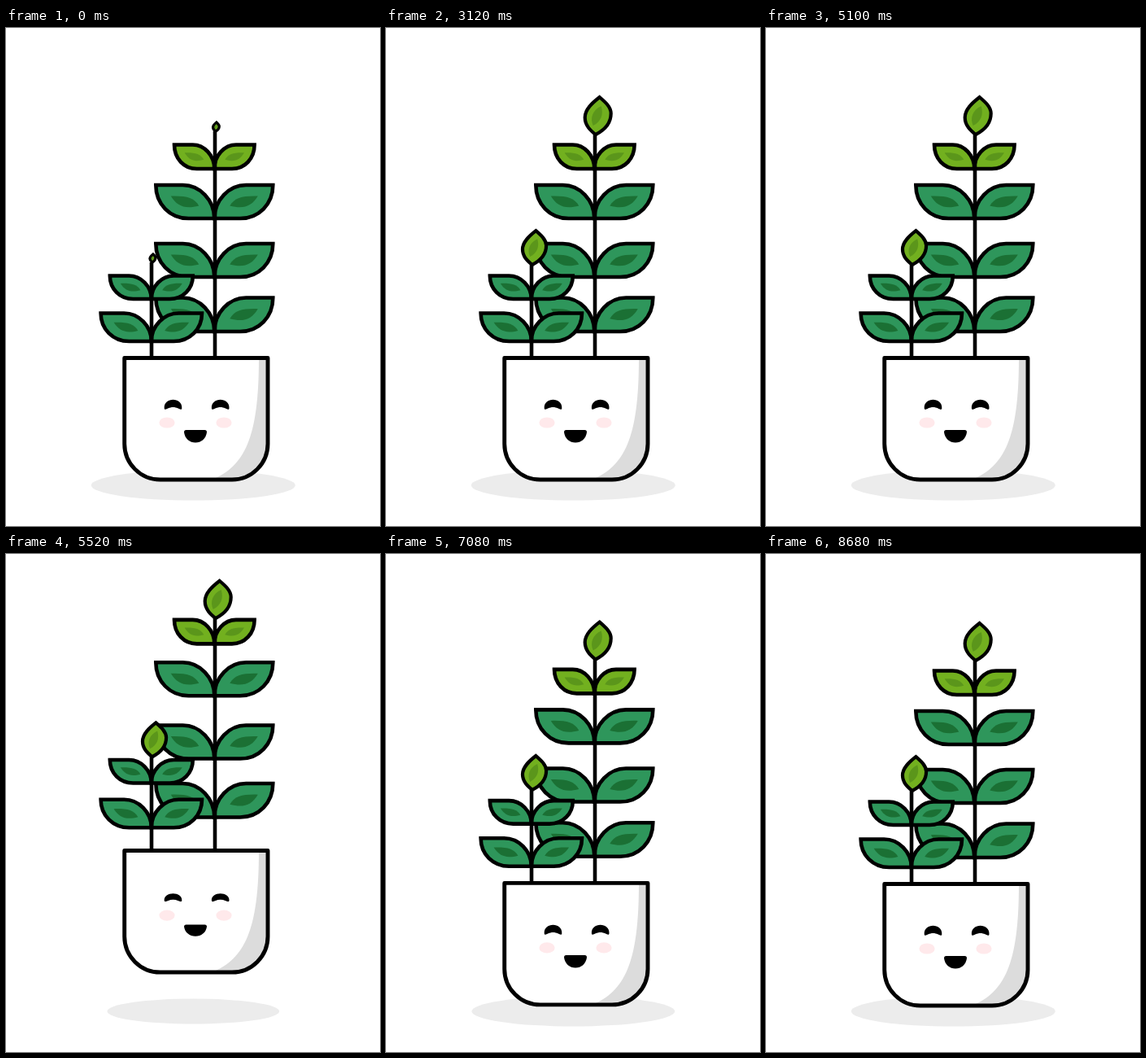
An HTML page with a canvas for the animation above (8.9 s loop, 460 px wide and 612 px high).

```html
<!DOCTYPE html>
<html lang="en">
<head>
<meta charset="utf-8">
<title>Happy plant</title>
<style>
  html, body { margin: 0; width: 100%; height: 100%; overflow: hidden; background: #fff; }
  canvas { display: block; width: 460px; height: 612px; }
</style>
</head>
<body>
<canvas id="stage"></canvas>
<script>
const W = 460, H = 612, LOOP = 8900;
const canvas = document.getElementById('stage');
const ctx = canvas.getContext('2d');
const dpr = window.devicePixelRatio || 1;
canvas.width = W * dpr;
canvas.height = H * dpr;

const GREEN = ['#2e965b', '#1b7034'];
const LIME = ['#72b01f', '#5b961b'];
const LINE = 4.6;

// Moments at which the motion pauses, then catches up.
const HOLDS = [[1640, 1860], [2300, 2460], [3960, 4140], [4140, 4380],
  [5520, 5760], [5800, 5980], [8360, 8500]];
const JUMPS = [3690, 5096, 6477, 7870];
const JUMP_HEIGHT = 42, FALL_AT = 390, JUMP_END = 792;

// Leaf pairs: top y, leaf width, leaf height, colours, lift per pixel of jump.
const TALL = { x: 257, leafX: 256.3, rows: [
  [331.5, 72, 41.5, GREEN, 1.21],
  [265, 72, 41, GREEN, 1.33],
  [193, 72, 41, GREEN, 1.46],
  [143.5, 49.3, 29.5, LIME, 1.53]
], bud: { x: 257.7, y: 131, size: 1, lift: 1.27, startY: 127 } };
const SMALL = { x: 179, leafX: 178.8, rows: [
  [350.5, 62.2, 34.5, GREEN, 1.19],
  [304.5, 51, 28.5, GREEN, 1.26]
], bud: { x: 179.8, y: 291, size: 0.91, lift: 1.02, startY: 288 } };

const shapes = {
  bud: new Path2D('M5 -46C-4 -39-13 -31-13 -21C-13 -11-6 -5 0 0C10 -5 19 -13 19 -26C19 -34 12 -40 5 -46Z'),
  budVein: new Path2D('M7 -35C10 -25 7 -16-3 -11C-7 -20-4 -30 7 -35Z'),
  vein: new Path2D('M19 25.5C25 15 35 13 53.5 13.5C46 26 36 30 19 25.5Z'),
  pot: new Path2D('M145.7 405.5H322V511A44 44 0 0 1 278 555H189.7A44 44 0 0 1 145.7 511Z'),
  shade: new Path2D('M311 406H322V511A44 44 0 0 1 278 555H254C293 538 311 505 311 406Z'),
  eye: new Path2D('M-10.8 4.5C-12 -9.8 12 -9.8 10.8 4.5C10 8 6 3 0 3C-6 3-10 8-10.8 4.5Z'),
  mouth: new Path2D('M-14 -5Q-14 -7.8-11.5 -7.8H11.5Q14 -7.8 14 -5C13 3 7 7.8 0 7.8C-7 7.8-13 3-14 -5Z')
};

const hill = ms => { const r = (Math.max(ms, 0) / 86) ** 4; return r / (1 + r); };

function clock(ms) {
  const t = Math.floor(ms / 20) * 20;
  const hold = HOLDS.find(([from, to]) => t >= from && t < to);
  return hold ? hold[0] : t;
}

function growth(t) {
  if (t <= 1320) return 0;
  if (t >= 3120) return 1;
  if (t <= 2300) {
    const u = (t - 1320) / 980;
    return 0.457 * u + 0.193 * u * u;
  }
  const rest = 1 - (t - 2300) / 820;
  return 1 - 0.35 * rest * rest;
}

function jump(t) {
  const start = JUMPS.find(s => t >= s && t < s + JUMP_END);
  if (start === undefined) return 0;
  const age = t - start;
  return JUMP_HEIGHT * hill(age) * (1 - hill(age - FALL_AT));
}

function at(x, y, sx, sy, draw) {
  ctx.save();
  ctx.translate(x, y);
  ctx.scale(sx, sy);
  draw();
  ctx.restore();
}

function ellipse(x, y, rx, ry, color) {
  ctx.fillStyle = color;
  ctx.beginPath();
  ctx.ellipse(x, y, rx, ry, 0, 0, Math.PI * 2);
  ctx.fill();
}

function fill(path, color) {
  ctx.fillStyle = color;
  ctx.fill(path);
}

function leaf(w, h, [color, dark]) {
  ctx.beginPath();
  ctx.moveTo(0, h);
  ctx.bezierCurveTo(0, 0.45 * h, 0.25 * w, 0, 0.54 * w, 0);
  ctx.lineTo(w, 0);
  ctx.bezierCurveTo(w, 0.57 * h, 0.76 * w, h, 0.44 * w, h);
  ctx.closePath();
  ctx.fillStyle = color;
  ctx.fill();
  ctx.lineWidth = LINE;
  ctx.stroke();
  at(0, 0, w / 72, h / 41, () => fill(shapes.vein, dark));
}

function bud({ x, y, size, lift, startY }, grown, height) {
  const baseY = startY + (y - startY) * Math.min(1, grown * 1.5) - lift * height;
  const s = size * (0.24 + 0.76 * grown);
  at(x, baseY, s, s, () => {
    fill(shapes.bud, LIME[0]);
    fill(shapes.budVein, LIME[1]);
    ctx.lineWidth = (3.3 + 0.9 * grown) / s;
    ctx.stroke(shapes.bud);
  });
}

function plant({ x, leafX, rows, bud: tip }, grown, height) {
  for (const [y, w, h, colors, lift] of rows) {
    for (const side of [-1, 1]) {
      at(leafX, y - lift * height, side, 1, () => leaf(w, h, colors));
    }
  }
  ctx.lineWidth = LINE;
  ctx.beginPath();
  ctx.moveTo(x, tip.startY + (tip.y - tip.startY) * grown - tip.lift * height);
  ctx.lineTo(x, 408 - height);
  ctx.stroke();
  bud(tip, grown, height);
}

function pot(height) {
  const air = height / JUMP_HEIGHT;
  at(0, -height, 1, 1, () => {
    fill(shapes.pot, '#fff');
    fill(shapes.shade, '#dcdcdc');
    ctx.lineWidth = 4.9;
    ctx.stroke(shapes.pot);
    for (const x of [198, 268]) ellipse(x, 485, 9.6, 6.6, '#ffe9eb');
    for (const x of [205.5, 263.7]) {
      at(x, 463 + 0.3 * air, 1, 1 - 0.17 * air, () => fill(shapes.eye, '#000'));
    }
    at(233, 501.7 + 1.9 * air, 1, 1 - 0.09 * air, () => fill(shapes.mouth, '#000'));
  });
}

function render(ms) {
  const t = clock(ms), grown = growth(t), height = jump(t);
  ctx.setTransform(dpr, 0, 0, dpr, 0, 0);
  ctx.fillStyle = '#fff';
  ctx.fillRect(0, 0, W, H);
  ctx.strokeStyle = '#000';
  ctx.lineJoin = 'miter';
  ellipse(230.3, 562, 125.5 - 0.48 * height, 18.6 - 0.075 * height, '#ececec');
  plant(TALL, grown, height);
  plant(SMALL, grown, height);
  ctx.lineJoin = 'round';
  pot(height);
}

const begin = performance.now();
function tick() {
  render((performance.now() - begin) % LOOP);
  requestAnimationFrame(tick);
}
tick();
</script>
</body>
</html>
```
